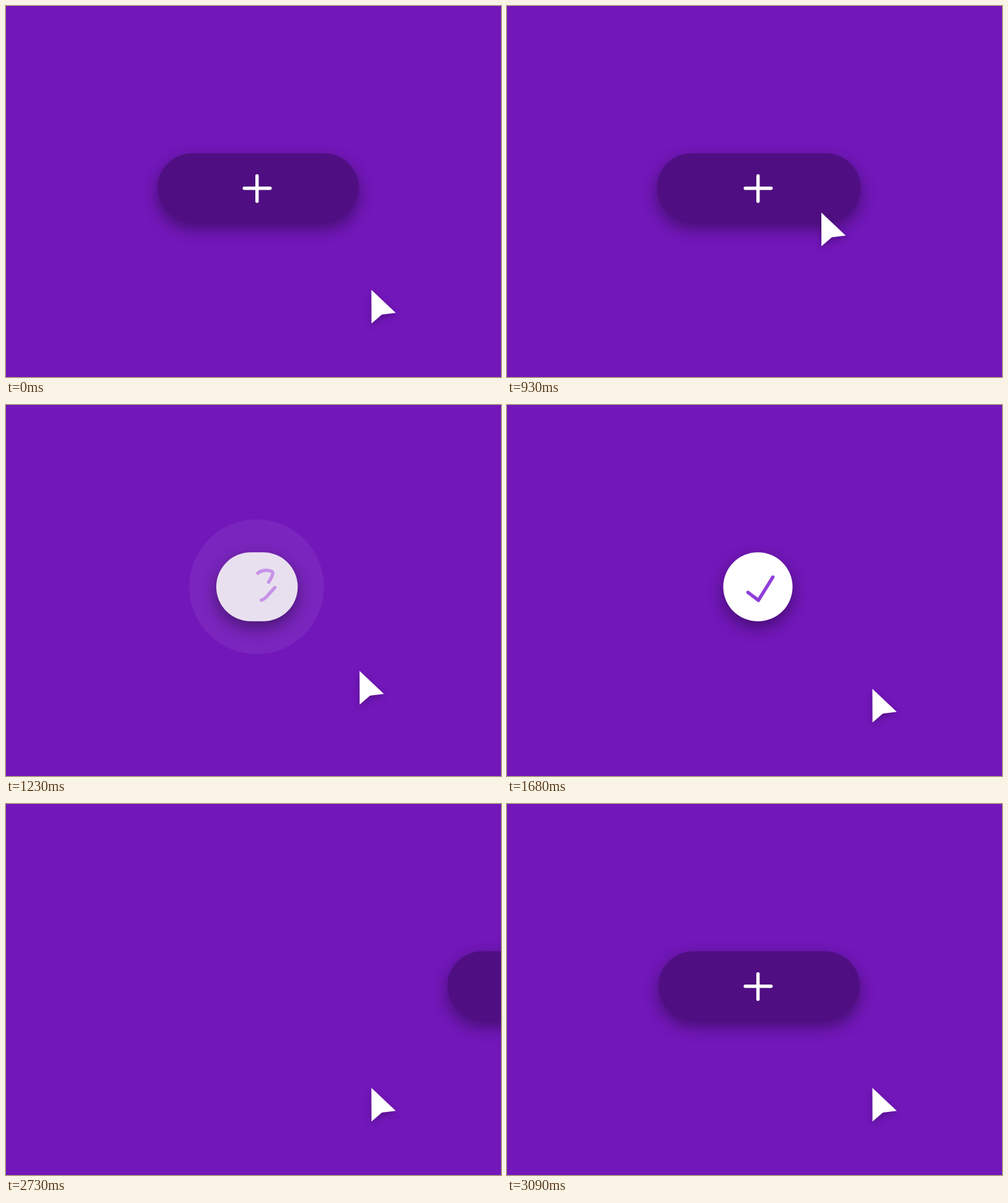
These frames come from a looping animation (800 by 600 pixels, 3450 ms). An HTML page with a canvas:

```html
<!DOCTYPE html>
<html lang="en">
<head>
<meta charset="utf-8">
<title>Add button</title>
<style>
  html, body { margin: 0; height: 100%; overflow: hidden; background: #7217ba; }
  canvas { display: block; }
</style>
</head>
<body>
<canvas width="800" height="600"></canvas>
<script>
const ctx = document.querySelector('canvas').getContext('2d');
const LOOP = 3450, STEP = 30;

const clamp = v => Math.min(1, Math.max(0, v));
const mix = (a, b, p) => a + (b - a) * p;
const mixAll = (a, b, p) => a.map((v, i) => mix(v, b[i], p));
const rgb = (c, alpha = 1) => `rgba(${c.map(Math.round)},${alpha})`;

// Standard curve: cubic-bezier(.4, 0, .2, 1)
function ease(x) {
  let lo = 0, hi = 1;
  for (let i = 0; i < 20; i++) {
    const u = (lo + hi) / 2, v = 1 - u;
    if (1.2 * v * v * u + 0.6 * v * u * u + u * u * u < x) lo = u; else hi = u;
  }
  return lo * lo * (3 - 2 * lo);
}
const tween = (t, start, end) => ease(clamp((t - start) / (end - start)));

const DARK = [79, 15, 130], WHITE = [255, 255, 255];
const LILAC = [198, 147, 232], VIOLET = [143, 62, 218];

// Five points per stroke, so that every shape can morph into the next
const line = (x0, y0, x1, y1) =>
  [0, 1, 2, 3, 4].flatMap(i => [mix(x0, x1, i / 4), mix(y0, y1, i / 4)]);
const PLUS = [line(405.7, 274.7, 405.7, 315.8), line(385.2, 294.8, 426.8, 294.8)];
const SWIRL = [
  [407, 272, 411.5, 268, 426, 267, 434, 272, 424.5, 286.5],
  [412.8, 315.5, 417, 314.5, 424, 307, 429, 301, 434.5, 295.3]
];
const CHECK = [line(389.5, 303, 406.3, 315.8), line(406.3, 315.8, 429.7, 278.3)];

function shadow(y, blur, alpha) {
  ctx.shadowColor = `rgba(0,0,0,${alpha})`;
  ctx.shadowOffsetY = y;
  ctx.shadowBlur = blur;
}

function drawStroke(p) {
  ctx.beginPath();
  ctx.moveTo(p[0], p[1]);
  for (let i = 2; i < 6; i += 2)
    ctx.quadraticCurveTo(p[i], p[i + 1], (p[i] + p[i + 2]) / 2, (p[i + 1] + p[i + 3]) / 2);
  ctx.quadraticCurveTo(p[6], p[7], p[8], p[9]);
  ctx.stroke();
}

function drawRipple(t) {
  const grow = tween(t, 940, 1420);
  if (!grow || t > 1440) return;
  ctx.fillStyle = `rgba(255,255,255,${0.06 * clamp((1440 - t) / 210)})`;
  ctx.beginPath();
  ctx.arc(405, 294, 124 * grow, 0, 7);
  ctx.fill();
}

function drawButton(t) {
  const hover = tween(t, 500, 900), close = tween(t, 943, 1386);
  const reset = t > 2700;
  let left = 245, right = 570, fill = DARK, shapes = PLUS, ink = WHITE, shift = 0;

  if (!reset) {
    left = mix(mix(245, 242.2, hover), 349.5, close);
    right = mix(mix(570, 571.5, hover), 461.5, close);
    fill = mixAll(DARK, WHITE, tween(t, 943, 1425));
    const bend = tween(t, 950, 1230), settle = tween(t, 1230, 1500);
    shapes = PLUS.map((s, i) => mixAll(mixAll(s, SWIRL[i], bend), CHECK[i], settle));
    ink = mixAll(mixAll(WHITE, LILAC, bend), VIOLET, settle);
    // Swing right, then leave to the left
    const s = Math.max(0, (t - 2006) / 291);
    shift = 2019 * s ** 3 * (1 - s);
  } else {
    // Enter from the right, overshoot and come back
    const u = Math.max(0, (3102 - t) / 301);
    shift = 1052 * u ** 3 * (u - 1);
  }

  ctx.save();
  ctx.translate(shift, 0);
  ctx.save();
  shadow(10, 26, 0.4);
  ctx.fillStyle = rgb(fill);
  ctx.beginPath();
  ctx.roundRect(left, 238.3, right - left, 111.5, 55.75);
  ctx.fill();
  ctx.restore();
  ctx.strokeStyle = rgb(ink);
  ctx.lineWidth = 5.4;
  ctx.lineCap = 'round';
  shapes.forEach(drawStroke);
  ctx.restore();
}

function drawCursor(t) {
  const p = tween(t, 260, 703) - tween(t, 1011, 1454);
  ctx.save();
  ctx.translate(590.5 - 82.5 * p, 459 - 125 * p);
  shadow(4, 12, 0.25);
  ctx.fillStyle = '#fff';
  ctx.beginPath();
  ctx.moveTo(0, 0);
  ctx.lineTo(39.4, 37.3);
  ctx.lineTo(17, 40);
  ctx.lineTo(0.2, 54.5);
  ctx.fill();
  ctx.restore();
}

function draw(now) {
  const t = Math.floor((now + 1) / STEP) * STEP % LOOP;
  ctx.fillStyle = '#7217ba';
  ctx.fillRect(0, 0, 800, 600);
  drawRipple(t);
  if (t < 2340 || t > 2700) drawButton(t);
  drawCursor(t);
  requestAnimationFrame(draw);
}
draw(0);
</script>
</body>
</html>
```
